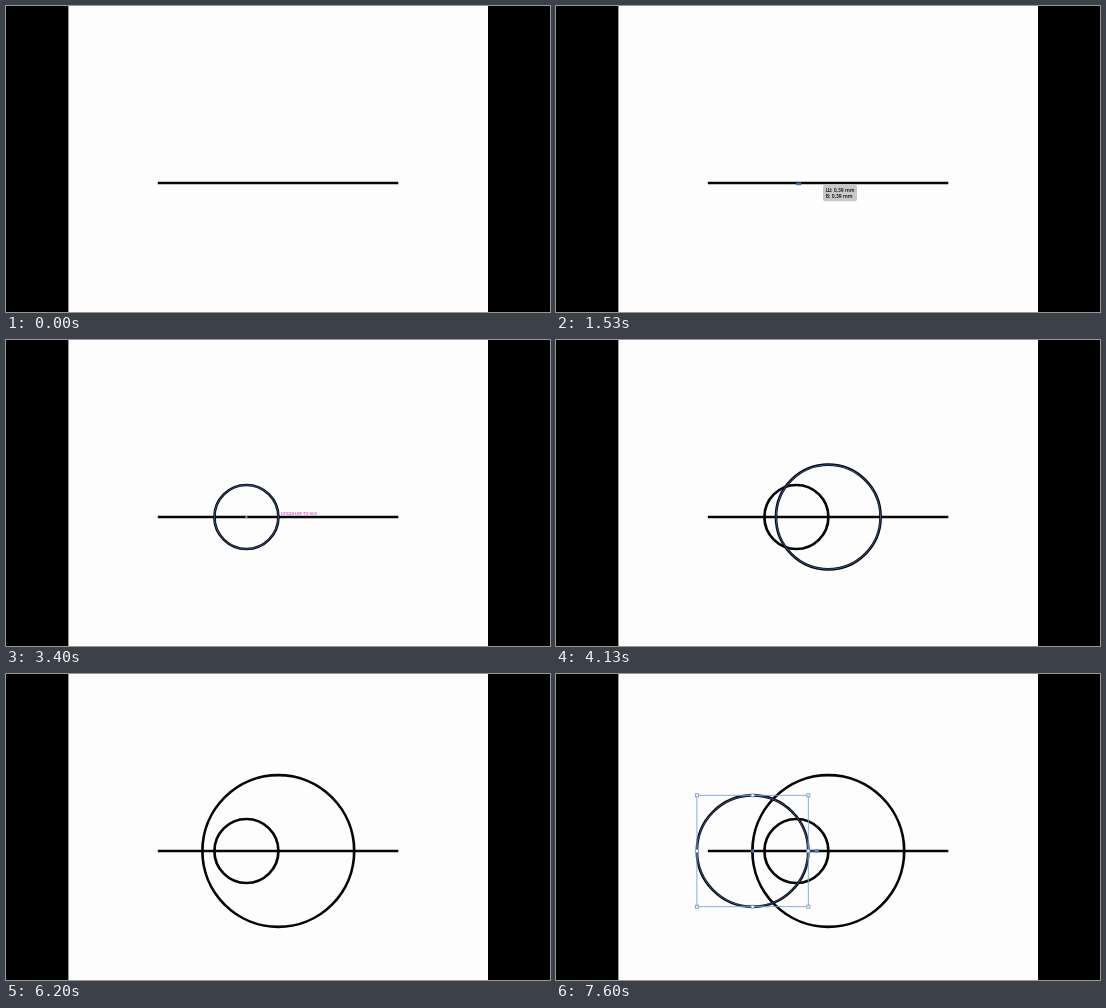
These frames come from a looping animation (544x306 px, 8 s). An HTML page with a canvas:

```html
<!DOCTYPE html>
<html lang="ru">
<head>
<meta charset="utf-8">
<style>
  html, body { margin: 0; width: 544px; height: 306px; overflow: hidden; background: #000; }
  canvas { display: block; }
</style>
</head>
<body>
<canvas id="stage" width="544" height="306"></canvas>
<script>
const ctx = document.getElementById('stage').getContext('2d');
const LOOP = 8000, TICK = 1000 / 15;
const AXIS = 177, INK = '#060607', BLUE = '#4a6fd2', STROKE = 2.7;
const MM_PER_PX = 10.81 / 64;

const small = { x: 240.4, r: 32 };
const big = { x: 272.3, r: 75.9 };
const left = { x: 196.6, r: 55.7 };

const lerp = (a, b, p) => a + (b - a) * p;
const clamp = v => Math.max(0, Math.min(1, v));
const ease = p => p * p * (3 - 2 * p);
const progress = (t, a, b) => ease(clamp((t - a) / (b - a)));

function line(x1, y1, x2, y2, color, width) {
  ctx.strokeStyle = color;
  ctx.lineWidth = width;
  ctx.beginPath();
  ctx.moveTo(x1, y1);
  ctx.lineTo(x2, y2);
  ctx.stroke();
}

function ring(x, r, color, width) {
  ctx.strokeStyle = color;
  ctx.lineWidth = width;
  ctx.beginPath();
  ctx.arc(x, AXIS, r, 0, Math.PI * 2);
  ctx.stroke();
}

function dot(x, y, r, color) {
  ctx.fillStyle = color;
  ctx.beginPath();
  ctx.arc(x, y, r, 0, Math.PI * 2);
  ctx.fill();
}

function circle(c, r, active) {
  ring(c.x, r, INK, STROKE);
  if (active) ring(c.x, r, 'rgba(72,112,190,.7)', 1);
}

function handle(x, y) {
  ctx.fillStyle = '#fff';
  ctx.fillRect(x - 1.5, y - 1.5, 3, 3);
  ctx.strokeStyle = '#7799d6';
  ctx.lineWidth = 0.9;
  ctx.strokeRect(x - 1.5, y - 1.5, 3, 3);
}

function selection(c) {
  const { x, r } = c;
  ctx.strokeStyle = '#7aa6d4';
  ctx.lineWidth = 0.9;
  ctx.strokeRect(x - r, AXIS - r, r * 2, r * 2);
  for (const i of [-1, 0, 1])
    for (const j of [-1, 0, 1])
      if (i || j) handle(x + i * r, AXIS + j * r);
  dot(x, AXIS, 1.7, BLUE);
  line(x + r + 2, AXIS, x + r + 7, AXIS, BLUE, 1);
  dot(x + r + 8.5, AXIS, 2.1, '#5b7fe0');
}

function sizeLabel(x, y, r, w) {
  const mm = (r * 2 * MM_PER_PX).toFixed(2).replace('.', ',');
  ctx.fillStyle = '#c8c8c8';
  ctx.beginPath();
  ctx.roundRect(x, y, w, 16.5, 2);
  ctx.fill();
  ctx.fillStyle = '#080808';
  ctx.font = '600 5px "Open Sans", Arial, sans-serif';
  ctx.fillText('Ш: ' + mm + ' mm', x + 2.8, y + 6.9);
  ctx.fillText('В: ' + mm + ' mm', x + 2.8, y + 13.6);
}

function draw(t) {
  ctx.fillStyle = '#000';
  ctx.fillRect(0, 0, 544, 306);
  ctx.fillStyle = '#fdfdfd';
  ctx.fillRect(62.4, 0, 419.6, 306);
  line(151.8, AXIS, 392.3, AXIS, INK, STROKE);

  if (t >= 1530) {
    const p = progress(t, 1540, 2130);
    const r = lerp(1.16, small.r, p);
    if (p === 0) {
      ctx.fillStyle = '#3f67c4';
      ctx.fillRect(240.2, 176.6, 5, 2.6);
    } else {
      circle(small, r, t < 3930);
    }
    if (p > 0 && t < 3930) dot(small.x, AXIS, 1.2, t < 3000 ? '#7468c8' : '#888e9e');
    if (t < 2600) sizeLabel(lerp(267, 293.3, p), lerp(178.7, 192.8, p), r, lerp(34, 36.5, p));
    if (p === 1 && t < 3000) {
      dot(272, 192.4, 1.4, '#34549e');
      line(272.3, 178, 272.3, 186, '#7a62c4', 1.2);
    }
  }

  if (t >= 3330 && t < 3930) {
    ctx.fillStyle = '#d430d0';
    ctx.font = '5px "Open Sans", Arial, sans-serif';
    ctx.fillText('опорная точка', 274.8, 175.2);
  }

  if (t >= 3930) {
    circle(big, big.r * progress(t, 3800, 4330), t < 6200);
    if (t >= 4800 && t < 6200) {
      selection(big);
      dot(196.4, 205.5, 1.4, '#3f78b0');
    }
  }

  if (t >= 6800) {
    circle(left, left.r * progress(t, 6670, 7200), true);
    if (t >= 7400) selection(left);
  }
}

const start = performance.now();
function frame(now) {
  const t = Math.max(0, now - start) % LOOP;
  // Motion advances at 15 steps a second.
  draw(Math.floor(t / TICK + 0.06) * TICK);
  requestAnimationFrame(frame);
}
draw(0);
requestAnimationFrame(frame);
</script>
</body>
</html>
```
